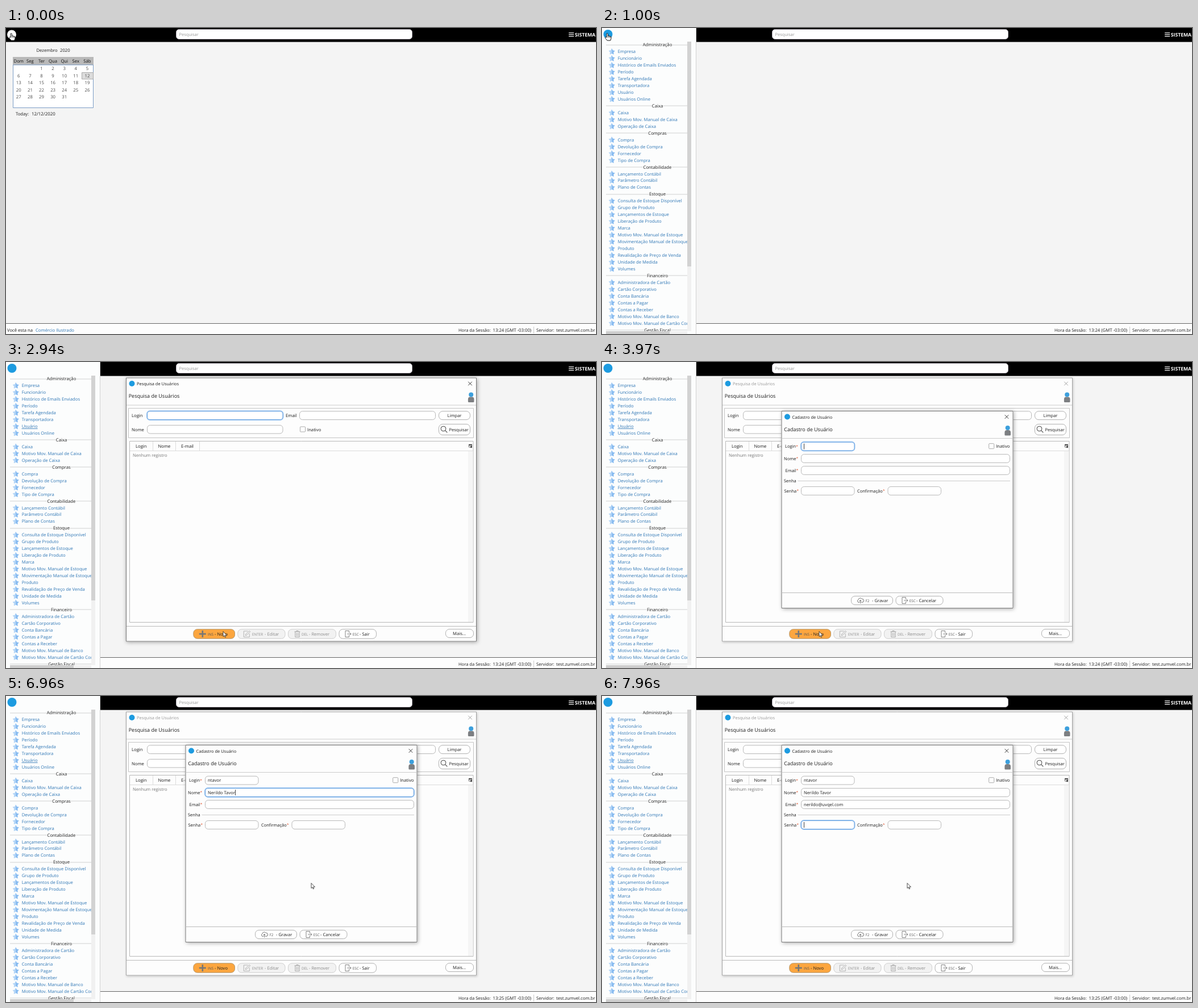
Write an HTML page with a canvas that moves like this. It is 1038 by 539 pixels and loops after 8 s.

```html
<!DOCTYPE html>
<html lang="pt-BR">
<head>
<meta charset="utf-8">
<title>Cadastro de Usuário</title>
<style>
html, body { margin: 0; width: 100%; height: 100%; overflow: hidden; background: #f4f4f4; }
canvas { display: block; width: 1038px; height: 539px; }
</style>
</head>
<body>
<canvas id="stage"></canvas>
<script>
const W = 1038, H = 539, LOOP = 8000;
const INK = '#1c1c1c', LINK = '#2e76b5', BLUE = '#1d9be0', LINE = '#b8b8b8', ICON = '#666';
const canvas = document.getElementById('stage');
const ctx = canvas.getContext('2d');
const dpr = window.devicePixelRatio || 1;
canvas.width = Math.round(W * dpr);
canvas.height = Math.round(H * dpr);

const menu = [
  ['Administração', 'Empresa', 'Funcionário', 'Histórico de Emails Enviados', 'Período',
    'Tarefa Agendada', 'Transportadora', 'Usuário', 'Usuários Online'],
  ['Caixa', 'Caixa', 'Motivo Mov. Manual de Caixa', 'Operação de Caixa'],
  ['Compras', 'Compra', 'Devolução de Compra', 'Fornecedor', 'Tipo de Compra'],
  ['Contabilidade', 'Lançamento Contábil', 'Parâmetro Contábil', 'Plano de Contas'],
  ['Estoque', 'Consulta de Estoque Disponível', 'Grupo de Produto', 'Lançamentos de Estoque',
    'Liberação de Produto', 'Marca', 'Motivo Mov. Manual de Estoque',
    'Movimentação Manual de Estoque', 'Produto', 'Revalidação de Preço de Venda',
    'Unidade de Medida', 'Volumes'],
  ['Financeiro', 'Administradora de Cartão', 'Cartão Corporativo', 'Conta Bancária',
    'Contas a Pagar', 'Contas a Receber', 'Motivo Mov. Manual de Banco',
    'Motivo Mov. Manual de Cartão Corporativo'],
  ['Gestão Fiscal']
];

function setFont(size, weight = 400) {
  ctx.font = `${weight} ${size}px "Open Sans", "Noto Sans", sans-serif`;
}

// Text is placed by its vertical centre; returns its width.
function text(str, x, y, color = INK, size = 7.7, align = 'left', weight = 400) {
  setFont(size, weight);
  ctx.textAlign = align;
  ctx.fillStyle = color;
  ctx.fillText(str, x, y + size * 0.35);
  return ctx.measureText(str).width;
}

function rect(x, y, x2, y2, color) {
  ctx.fillStyle = color;
  ctx.fillRect(x, y, x2 - x, y2 - y);
}

function box(x, y, x2, y2, r, fill, stroke, width = 1) {
  ctx.beginPath();
  ctx.roundRect(x, y, x2 - x, y2 - y, r);
  if (fill) { ctx.fillStyle = fill; ctx.fill(); }
  if (stroke) { ctx.strokeStyle = stroke; ctx.lineWidth = width; ctx.stroke(); }
}

function dot(x, y, r, color) {
  ctx.fillStyle = color;
  ctx.beginPath();
  ctx.arc(x, y, r, 0, Math.PI * 2);
  ctx.fill();
}

function path(d, x, y, stroke, fill, width = 1) {
  const p = new Path2D(d);
  ctx.save();
  ctx.translate(x, y);
  ctx.lineJoin = ctx.lineCap = 'round';
  if (fill) { ctx.fillStyle = fill; ctx.fill(p); }
  if (stroke) { ctx.strokeStyle = stroke; ctx.lineWidth = width; ctx.stroke(p); }
  ctx.restore();
}

const hline = (x, x2, y, color = LINE) => rect(x, y, x2, y + 1, color);
const vline = (x, y, y2, color = LINE) => rect(x, y, x + 1, y2, color);

const icons = {
  plus(x, y) {
    rect(x - 6, y - 1.3, x + 6, y + 1.3, '#777');
    rect(x - 1.3, y - 6, x + 1.3, y + 6, '#777');
  },
  edit(x, y) {
    path('M1.5-5H-5.5V5.5H4.5V0M-2.5 2.5L-1.7 0L4.5-5.5L6-4L0 1.8Z', x, y, '#a5a5a5', null, 0.8);
  },
  trash(x, y) {
    path('M-4.5-4H4.5M-1.5-4V-5.5H1.5V-4M-3.7-4V5.5H3.7V-4M-1.3-1.5V3.5M1.3-1.5V3.5', x, y, '#999', null, 0.8);
  },
  exit(x, y) {
    path('M1.5-2.5V-5.5H-5V5.5H1.5V2.5M-1.5 0H5M3-2L5 0L3 2', x, y, ICON, null, 0.8);
  },
  upload(x, y) {
    path('M-1.8 3.3H-3.6A2.5 2.5 0 0 1-3.6-1.2A3.6 3.6 0 0 1 2.8-2.7A3 3 0 0 1 3.6 3.3H1.8M0 5V-.5M-1.8 1.2L0-.7L1.8 1.2',
      x, y, ICON, null, 0.9);
  }
};

function hand(x, y) {
  path('M3 7V1.2Q4.2-.4 5.4 1.2V5Q6.6 4 7.4 5.2Q8.6 4.6 9.2 5.8Q10.8 5.4 11 7V9.5L9.8 13H4.2L.5 8.5Q.9 6.2 3 7Z',
    x, y, '#111', '#fff');
  path('M5.4 5V7.5M7.4 5.5V7.5M9.2 6V8', x, y, '#111', null, 0.7);
}

const arrow = (x, y) =>
  path('M0 0V8.6L2 6.8L3.4 10L4.8 9.4L3.4 6.3H6.1Z', x, y, '#222', '#fff', 0.8);

const cross = (x, y, color) => path('M-3-3L3 3M3-3L-3 3', x, y, color, null, 0.9);

function person(x, y) {
  box(x - 5.3, y, x + 5.3, y + 9.5, [4, 4, 1.5, 1.5], '#7d7f82');
  dot(x, y - 4, 4, '#3c9fdc');
}

function star(x, y) {
  const points = Array.from({ length: 10 }, (_, i) => {
    const a = -Math.PI / 2 + i * Math.PI / 5, r = i % 2 ? 2.9 : 5.4;
    return `${(Math.cos(a) * r).toFixed(2)} ${(Math.sin(a) * r).toFixed(2)}`;
  });
  path('M' + points.join('L') + 'Z', x, y, '#a6cdf4', '#b4d6f8', 0.6);
  path('M' + points.slice(0, 6).join('L') + 'Z', x, y, null, '#86baf0');
}

function field(x, y, x2, y2, { focus = false, value = '', caret = false } = {}) {
  if (focus) {
    box(x - 0.4, y - 0.4, x2 + 0.4, y2 + 0.4, 5, '#fff', '#a9cdf4', 2.2);
    box(x, y, x2, y2, 4.5, '#fff', '#5a9ade');
  } else {
    box(x, y, x2, y2, 5, '#fff', LINE);
  }
  const cy = (y + y2) / 2;
  const w = value ? text(value, x + 4.5, cy) : 0;
  if (caret) rect(x + 4.7 + w, cy - 5, x + 5.5 + w, cy + 5, '#111');
}

function check(x, y, focus) {
  if (focus) box(x - 0.5, y - 0.5, x + 9.5, y + 9.5, 2, null, '#a9cdf4', 2.2);
  box(x, y, x + 9, y + 9, 1, '#fff', focus ? '#5a9ade' : '#aaa');
  text('Inativo', x + 12.5, y + 5);
}

function button(x, y, x2, y2, fill = '#fff', stroke = '#b0b0b0') {
  box(x, y, x2, y2, 6.5, fill, stroke);
}

function keyButton(x, x2, y, half, icon, key, label, keyX, labelX, { fill, stroke, color = INK } = {}) {
  button(x, y - half, x2, y + half, fill, stroke);
  icons[icon](x + 16, y);
  text(key, keyX, y + 0.5, color === INK ? '#555' : color, 6.3);
  text('- ' + label, labelX, y, color, 7.6);
}

function frame(x, y, x2, y2, title, active) {
  ctx.save();
  ctx.shadowColor = `rgba(0,0,0,${active ? 0.36 : 0.2})`;
  ctx.shadowBlur = (active ? 7 : 4) * dpr;
  ctx.shadowOffsetX = ctx.shadowOffsetY = dpr;
  rect(x, y, x2, y2, '#fdfdfd');
  ctx.restore();
  box(x + 0.5, y + 0.5, x2 - 0.5, y2 - 0.5, 0, null, active ? '#777' : '#a0a0a0');
  dot(x + 10.5, y + 10.5, 5, BLUE);
  text(title, x + 19, y + 11, active ? INK : '#999', 7.45);
  cross(x2 - 11.5, y + 10.5, active ? '#222' : '#999');
  text(title, x + 4.7, y + 32.5, INK, 9);
  person(x2 - 9.8, y + 34);
  hline(x + 1, x2 - 1, y + 48, '#ccc');
}

function topBar() {
  rect(0, 0, W, 24.6, '#000');
  box(299.5, 2.5, 714.5, 19.5, 5, '#fff', '#b9b4bd');
  text('Pesquisar', 304.5, 11, '#999', 7.5);
  for (const y of [8, 11, 14]) rect(990, y, 999, y + 1.2, '#fff');
  text('SISTEMA', 1037, 12, '#fff', 8.6, 'right', 700);
}

function footer(clock) {
  rect(0, 521, W, H, '#fdfdfd');
  hline(0, W, 520, '#666');
  text('Você esta na', 2, 532);
  text('Comércio Ilustrado', 52, 532, LINK);
  text('Hora da Sessão:', 796, 532, INK, 7.6);
  text(clock + ' (GMT -03:00)', 856.5, 532, INK, 7.75);
  vline(928, 526, 538, '#ccc');
  text('Servidor:', 933, 532, INK, 7.6);
  text('test.zumvel.com.br', 968, 532);
}

function calendar() {
  text('Dezembro', 53.5, 39.5);
  text('2020', 95, 39.5);
  rect(12, 51, 154, 140, '#fff');
  rect(12, 51, 154, 65, '#b9b9b9');
  box(12.5, 65, 153.5, 140.5, 0, null, '#7b9cc6');
  const colX = c => 22.3 + c * 20.1;
  'Dom Seg Ter Qua Qui Sex Sáb'.split(' ')
    .forEach((d, c) => text(d, colX(c), 58, '#111', 7.7, 'center'));
  box(133.5, 78.5, 153.5, 90, 0, '#dcdcdc', '#aaa');
  for (let d = 1; d <= 31; d++) {
    const cell = d + 1;
    text(d, colX(cell % 7), 71.5 + Math.floor(cell / 7) * 12.5, '#4a4a4a', 7.8, 'center');
  }
  text('Today:', 17, 151.5);
  text('12/12/2020', 45, 151.5, INK, 7.85);
}

function sidebar(hover, opened) {
  rect(0, 0, 166, H, '#fcfdfd');
  vline(165, 0, H, '#d2d2d2');
  dot(10.5, 11, 8, BLUE);
  ctx.save();
  ctx.beginPath();
  ctx.rect(0, 24, 150.5, 510);
  ctx.clip();
  let row = 0;
  const nextY = () => 29.7 + 11.955 * row++;
  for (const [head, ...items] of menu) {
    const hy = nextY();
    hline(7, 150, Math.round(hy) - 0.5, '#d2d2d2');
    setFont(7.7);
    const half = ctx.measureText(head).width / 2 + 0.5;
    rect(97.5 - half, hy - 5, 97.5 + half, hy + 5, '#fcfdfd');
    text(head, 97.5, hy, INK, 7.7, 'center');
    for (const item of items) {
      const y = nextY();
      const color = hover && item === 'Usuário' ? '#23527c' : LINK;
      star(17.3, y + 0.3);
      const w = text(item, 27.7, y, color);
      if (item === 'Usuário' && (hover || opened)) rect(27.5, y + 3.8, 27.7 + w, y + 4.6, color);
    }
  }
  ctx.restore();
  rect(150, 24, 157, 534, '#f1f1f1');
  rect(150, 24, 157, 420, '#d2d2d2');
  rect(7, 534, 150, H, '#f1f1f1');
  rect(7, 534, 119, H, '#cecece');
}

function searchWindow(active) {
  frame(211, 27.5, 828, 492.5, 'Pesquisa de Usuários', active);
  box(215.5, 81.5, 822.5, 133.5, 0, null, '#c4c4c4');
  text('Login', 221, 94.5);
  field(248.5, 86.8, 487, 101.6, { focus: active });
  text('Email', 492, 94.5);
  field(516.5, 86.8, 755.5, 101.6);
  text('Nome', 221, 119);
  field(248.5, 111.4, 487, 126);
  check(517.5, 114, false);
  button(761.5, 86.8, 816.5, 101.6);
  text('Limpar', 789, 94.5, INK, 7.6, 'center');
  button(761.5, 109.5, 816.5, 128.5);
  path('M4.3 0A4.3 4.3 0 1 1-4.3 0A4.3 4.3 0 1 1 4.3 0M3.2 3.2L6.5 6.5', 769.5, 117.5, '#555', null, 1.1);
  text('Pesquisar', 779.5, 119, INK, 7.5);

  box(217.5, 139.5, 822, 458.5, 0, '#fdfdfd', LINE);
  rect(813, 157, 821.5, 458, '#f5f5f5');
  hline(218, 822, 156, '#dcdcdc');
  for (const x of [258, 298, 340]) vline(x, 140, 156, '#dcdcdc');
  text('Login', 228, 148);
  text('Nome', 267.5, 148);
  text('E-mail', 308, 148);
  box(814.5, 145.5, 819.5, 150, 0, '#fff', '#444', 0.8);
  rect(814, 145, 820, 147, '#444');
  rect(817, 148, 820, 151, '#444');
  text('Nenhum registro', 223, 164.8, '#777', 7.65);

  hline(212, 827, 465, '#bbb');
  const off = { fill: '#f2f2f2', stroke: '#cfcfcf', color: '#8a8a8a' };
  const main = { fill: '#fca63f', stroke: '#b5966a' };
  keyButton(329.8, 402.5, 479, 8.2, 'plus', 'INS', 'Novo', 355, 367, main);
  keyButton(407.8, 491, 479, 8.2, 'edit', 'ENTER', 'Editar', 433, 455, off);
  keyButton(496.5, 580.5, 479, 8.2, 'trash', 'DEL', 'Remover', 520, 533, off);
  keyButton(586, 651.5, 479, 8.2, 'exit', 'ESC', 'Sair', 609.7, 622);
  button(773.5, 470.7, 822.5, 485.5);
  text('Mais...', 797.5, 478, INK, 7.7, 'center');
}

function required(label, x, y) {
  const w = text(label, x, y, INK, 7.5);
  text('*', x + w + 0.2, y, '#e0552f', 6.5);
}

function userDialog(t) {
  const typedLogin = t >= 4950, typedName = t >= 6960, done = t >= 7960;
  const onName = t >= 5960 && !done;
  frame(315.5, 86, 723.5, 434, 'Cadastro de Usuário', true);
  required('Login', 322, 148.5);
  field(350.5, 141.2, 444, 156, { focus: !typedLogin, caret: !typedLogin, value: typedLogin ? 'ntavor' : '' });
  check(680.7, 143.7, typedLogin && t < 5960);
  required('Nome', 320, 170);
  field(350.5, 162.6, 717.5, 177.4, { focus: onName, caret: onName, value: typedName ? 'Nerildo Tavor' : '' });
  required('Email', 322.5, 191);
  field(350.5, 183.6, 717.5, 198.4, { value: done ? 'nerildo@uvqel.com' : '' });
  text('Senha', 320, 209.5, INK, 7.5);
  hline(344.5, 718, 209, '#ccc');
  required('Senha', 320.5, 227);
  field(350.5, 219.6, 444, 234.4, { focus: done, caret: done });
  required('Confirmação', 449, 227);
  field(503, 219.6, 596.5, 234.4);
  hline(316, 723, 406, '#bbb');
  keyButton(438.5, 511.5, 420, 7.6, 'upload', 'F2', 'Gravar', 463.5, 475);
  keyButton(517, 600, 420, 7.6, 'exit', 'ESC', 'Cancelar', 540.7, 553);
}

function draw(t) {
  ctx.setTransform(dpr, 0, 0, dpr, 0, 0);
  ctx.textRendering = 'geometricPrecision';
  rect(0, 0, W, H, '#f4f4f4');
  topBar();
  footer(t < 6960 ? '13:24' : '13:25');

  if (t < 1000) {
    dot(10, 11.5, 8, '#fff');
    calendar();
  } else {
    sidebar(t >= 1940 && t < 2940, t >= 2940);
  }
  if (t >= 2940) searchWindow(t < 3970);
  if (t >= 3970) userDialog(t);

  if (t < 1940) hand(5, 9);
  else if (t < 2940) hand(43.5, 113);
  else if (t < 4950) arrow(382, 475);
  else arrow(537, 330);
}

const start = performance.now();
function tick() {
  draw((performance.now() - start) % LOOP);
  requestAnimationFrame(tick);
}
tick();
</script>
</body>
</html>
```
